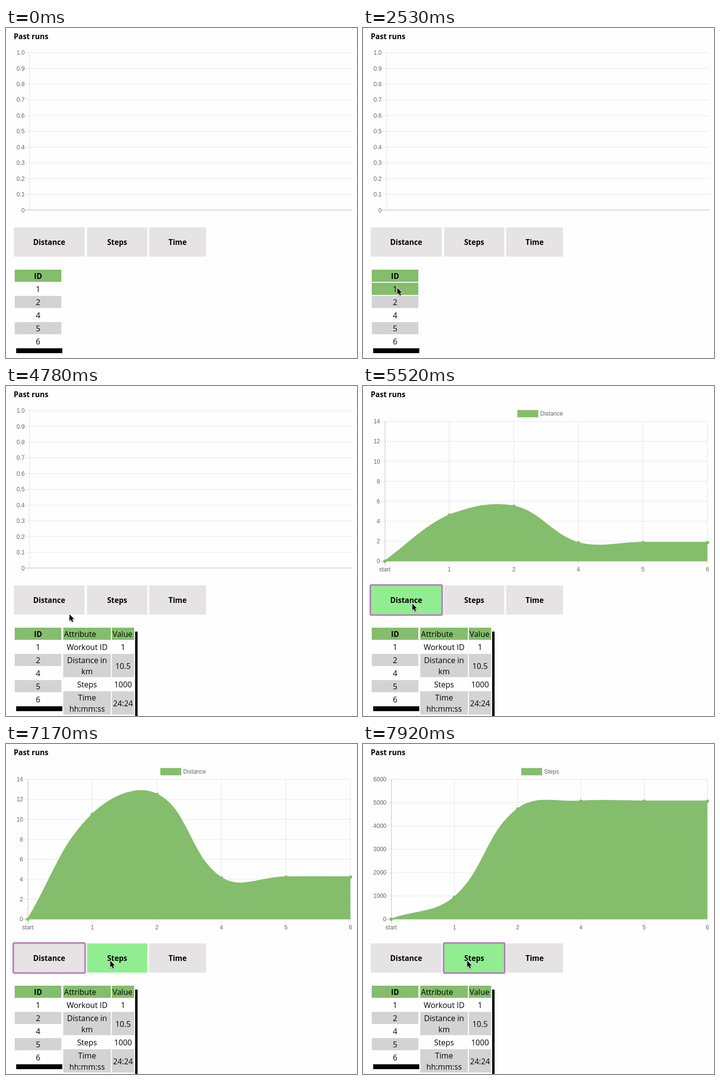
Animation of 723x680 px, one loop 8000 ms. Source, as an HTML page with a canvas:

```html
<!DOCTYPE html>
<html lang="en">
<head>
<meta charset="utf-8">
<title>Past runs</title>
<style>
  html, body { margin: 0; width: 100%; height: 100%; overflow: hidden; background: #fefefe; }
  canvas { display: block; width: 723px; height: 680px; }
</style>
</head>
<body>
<canvas id="stage" width="723" height="680"></canvas>
<script>
const ctx = document.getElementById('stage').getContext('2d');
const LOOP = 8000, STEP = 150;
const GREEN = '#84bd6c', HOVER = '#90ee90', GRAY = '#d3d3d3';
const UI = '"Open Sans", sans-serif';
const LABEL = '12px "Liberation Sans", Arial, sans-serif';

const TABLE_AT = 2830, DISTANCE_AT = 5370, STEPS_AT = 7470;

const charts = {
  distance: { title: 'Distance', left: 45, max: 14, unit: 2, legend: 318, start: 5385,
              values: [0, 10.5, 12.5, 4.13, 4.22, 4.22] },
  steps: { title: 'Steps', left: 58, max: 6000, unit: 1000, legend: 326, start: 7420,
           values: [0, 1000, 5047, 5400, 5400, 5400] }
};
const DAYS = ['start', '1', '2', '4', '5', '6'];
const TOP = 73, BASE = 361, RIGHT = 709.5;

const buttons = [
  { text: 'Distance', x: 16, w: 146 },
  { text: 'Steps', x: 167, w: 124 },
  { text: 'Time', x: 295, w: 117 }
];

// Pointer stops: time, x, y
const stops = [
  [140, 412, 289], [290, 365, 130],
  ...Array.from({ length: 7 }, (_, i) => {
    const p = (i + 1) / 7, e = p * p * (3 - 2 * p);
    return [590 + i * STEP, 365 - 286 * e, 130 + 374 * e];
  }),
  [1640, 71, 518], [1940, 71, 523], [2090, 71, 528], [2530, 71, 536],
  [2830, 76, 536], [2980, 95, 537], [3130, 130, 537], [3280, 155, 537],
  [4030, 175, 537], [4180, 212, 537], [4330, 237, 537],
  [4630, 190, 508], [4780, 131, 471], [4930, 110, 456], [5080, 102, 449],
  [6420, 230, 330], [6570, 400, 160], [6720, 482, 98], [6870, 425, 270],
  [7020, 265, 457], [7170, 215, 447]
];

function pointerAt(t) {
  const stop = stops.filter(s => s[0] <= t).pop();
  return stop ? { x: stop[1], y: stop[2] } : null;
}

function inside(p, x, y, w, h) {
  return p && p.x >= x && p.x < x + w && p.y >= y && p.y < y + h;
}

function rect(x, y, w, h, color) {
  ctx.fillStyle = color;
  ctx.fillRect(x, y, w, h);
}

function text(s, x, y, font, align = 'center', color = '#000') {
  ctx.font = font;
  ctx.textAlign = align;
  ctx.fillStyle = color;
  ctx.fillText(s, x, y);
}

const bold = (s, x, y, align) => text(s, x, y + 5.6, '700 15.2px ' + UI, align);
const plain = (s, x, y, align) => text(s, x, y + 5.8, '500 16px ' + UI, align);
const label = (s, x, y, align) => text(s, x, y + 4.3, LABEL, align, '#666');

const lineColor = dark => `rgba(0,0,0,${dark ? 0.25 : 0.1})`;

function hLine(x1, x2, y, dark) {
  rect(x1, y - 0.5, x2 - x1, 1, lineColor(dark));
}

function vLine(x, y1, y2, dark) {
  rect(Math.round(x - 0.5), y1, 1, y2 - y1, lineColor(dark));
}

function drawEmptyChart() {
  for (let i = 0; i <= 10; i++) {
    const y = 375.2 - i * 32.43;
    if (i) hLine(39, 713, y);
    else rect(39, 374.3, 674, 1.5, 'rgba(0,0,0,.2)');
    label(i ? (i / 10).toFixed(1) : '0', 38.5, y, 'right');
  }
  vLine(48.5, 51, 375);
}

// Bezier handles of a smoothed line with tension 0.4, kept inside the plot
function handles(pts) {
  const clampY = y => Math.min(BASE, Math.max(TOP, y));
  return pts.map((p, i) => {
    const a = pts[i - 1] || p, b = pts[i + 1] || p;
    const da = Math.hypot(p.x - a.x, p.y - a.y), db = Math.hypot(b.x - p.x, b.y - p.y);
    const fa = 0.4 * da / (da + db), fb = 0.4 * db / (da + db);
    return {
      x: p.x, y: p.y,
      ax: p.x - fa * (b.x - a.x), ay: clampY(p.y - fa * (b.y - a.y)),
      bx: p.x + fb * (b.x - a.x), by: clampY(p.y + fb * (b.y - a.y))
    };
  });
}

function traceLine(pts) {
  ctx.beginPath();
  ctx.moveTo(pts[0].x, pts[0].y);
  for (let i = 1; i < pts.length; i++) {
    const a = pts[i - 1], b = pts[i];
    ctx.bezierCurveTo(a.bx, a.by, b.ax, b.ay, b.x, b.y);
  }
}

function drawChart(chart, t) {
  const { left, max, unit } = chart;
  const p = Math.min(1, Math.max(0, (t - chart.start) / 1000));
  const grow = 1 - (1 - p) ** 4;
  const xAt = i => left + (RIGHT - left) * i / 5;

  for (let v = 0; v <= max; v += unit) {
    const y = BASE - (BASE - TOP) * v / max;
    hLine(left - 10, RIGHT, y, v === 0);
    label(String(v), left - 10, y, 'right');
  }
  DAYS.forEach((day, i) => {
    vLine(xAt(i), TOP, BASE + 10, i === 0);
    label(day, xAt(i), 378, 'center');
  });

  rect(chart.legend, 49.5, 43, 15, GREEN);
  label(chart.title, chart.legend + 47, 57, 'left');

  const flat = handles(chart.values.map((v, i) => ({ x: xAt(i), y: BASE })));
  const full = handles(chart.values.map((v, i) => ({ x: xAt(i), y: BASE - (BASE - TOP) * v / max })));
  const pts = full.map((q, i) => {
    const mix = {};
    for (const k in q) mix[k] = flat[i][k] + (q[k] - flat[i][k]) * grow;
    return mix;
  });

  ctx.save();
  ctx.beginPath();
  ctx.rect(left, TOP - 1.5, RIGHT - left, BASE - TOP + 2.5);
  ctx.clip();
  ctx.fillStyle = ctx.strokeStyle = GREEN;
  ctx.lineWidth = 3;
  traceLine(pts);
  ctx.stroke();
  ctx.lineTo(RIGHT, BASE);
  ctx.lineTo(left, BASE);
  ctx.fill();
  ctx.restore();

  ctx.fillStyle = GREEN;
  for (const q of pts) {
    ctx.beginPath();
    ctx.arc(q.x, q.y, 3.5, 0, 7);
    ctx.fill();
  }
}

function drawButtons(pointer, focus) {
  buttons.forEach(b => {
    rect(b.x, 411, b.w, 60, inside(pointer, b.x, 411, b.w, 60) ? HOVER : '#e5e3e4');
    bold(b.text, b.x + b.w / 2, 441);
  });
  if (!focus) return;
  const ring = (grow, width, color) => {
    ctx.beginPath();
    ctx.roundRect(focus.x - grow, 411 - grow, focus.w + 2 * grow, 60 + 2 * grow, 2.5);
    ctx.lineWidth = width;
    ctx.strokeStyle = color;
    ctx.stroke();
  };
  ring(1, 4.5, 'rgba(184,120,186,.35)');
  ring(1, 2.5, '#b678b8');
}

function drawIds(pointer) {
  rect(21, 660, 95, 10, '#000');
  rect(18, 498, 96, 25, GREEN);
  bold('ID', 66, 511);
  ['1', '2', '4', '5', '6'].forEach((id, i) => {
    const y = 525 + 27 * i;
    if (inside(pointer, 18, y + 5, 96, 20)) rect(18, y, 96, 25, GREEN);
    else if (i % 2) rect(18, y, 96, 25, GRAY);
    plain(id, 66, y + 13);
  });
}

function drawDetails(pointer) {
  rect(266, 506, 5, 174, '#000');
  const row = (y, h, color) => {
    rect(118, y, 98, h, color);
    rect(218, y, 46, h, color);
  };
  row(498, 25, GREEN);
  plain('Attribute', 119.5, 511, 'left');
  plain('Value', 219.5, 511, 'left');

  let y = 525;
  [
    [['Workout ID'], '1'],
    [['Distance in', 'km'], '10.5'],
    [['Steps'], '1000'],
    [['Time', 'hh:mm:ss'], '24:24']
  ].forEach(([lines, value], i) => {
    const h = lines.length > 1 ? 48 : 25;
    if (inside(pointer, 118, y, 146, h)) row(y, h, GREEN);
    else if (i % 2) row(y, h, GRAY);
    lines.forEach((s, n) => plain(s, 167, y + 13.5 + 23 * n));
    plain(value, 241, y + h / 2 + 0.8);
    y += h + 2;
  });
}

function drawArrow({ x, y }) {
  ctx.save();
  ctx.translate(x - 0.3, y - 0.6);
  ctx.beginPath();
  [[0, 0], [0, 13.5], [3, 10.8], [5.2, 15.8], [7.6, 14.8], [5.4, 9.9], [9.6, 9.9]]
    .forEach(([px, py]) => ctx.lineTo(px, py));
  ctx.closePath();
  ctx.lineJoin = 'round';
  ctx.lineWidth = 2;
  ctx.strokeStyle = '#fff';
  ctx.shadowColor = 'rgba(0,0,0,.35)';
  ctx.shadowBlur = 2;
  ctx.shadowOffsetY = 1;
  ctx.stroke();
  ctx.shadowColor = 'transparent';
  ctx.fillStyle = '#000';
  ctx.fill();
  ctx.restore();
}

function drawBeam({ x, y }) {
  ctx.beginPath();
  for (const s of [-1, 1]) {
    ctx.moveTo(x - 3.5, y + 7.5 * s);
    ctx.quadraticCurveTo(x, y + 7.5 * s, x, y + 5 * s);
    ctx.quadraticCurveTo(x, y + 7.5 * s, x + 3.5, y + 7.5 * s);
  }
  ctx.moveTo(x, y - 6);
  ctx.lineTo(x, y + 6);
  ctx.moveTo(x - 2, y + 3);
  ctx.lineTo(x + 2, y + 3);
  for (const [width, color] of [[2.8, '#fff'], [1.2, '#111']]) {
    ctx.lineWidth = width;
    ctx.strokeStyle = color;
    ctx.stroke();
  }
}

function draw(t) {
  const pointer = pointerAt(t);
  const held = from => from + Math.floor((t - from) / STEP) * STEP;

  rect(0, 0, 723, 680, '#fefefe');
  bold('Past runs', 16, 17.5, 'left');

  let focus = null;
  if (t >= STEPS_AT) {
    drawChart(charts.steps, held(STEPS_AT));
    focus = buttons[1];
  } else if (t >= DISTANCE_AT) {
    drawChart(charts.distance, held(DISTANCE_AT));
    focus = buttons[0];
  } else {
    drawEmptyChart();
  }

  drawButtons(pointer, focus);
  drawIds(pointer);
  if (t >= TABLE_AT) drawDetails(pointer);

  if (pointer) {
    const overText = t >= TABLE_AT && inside(pointer, 118, 525, 146, 25);
    (overText ? drawBeam : drawArrow)(pointer);
  }
}

const begin = performance.now();
function tick() {
  draw((performance.now() - begin) % LOOP);
  requestAnimationFrame(tick);
}
tick();
</script>
</body>
</html>
```
